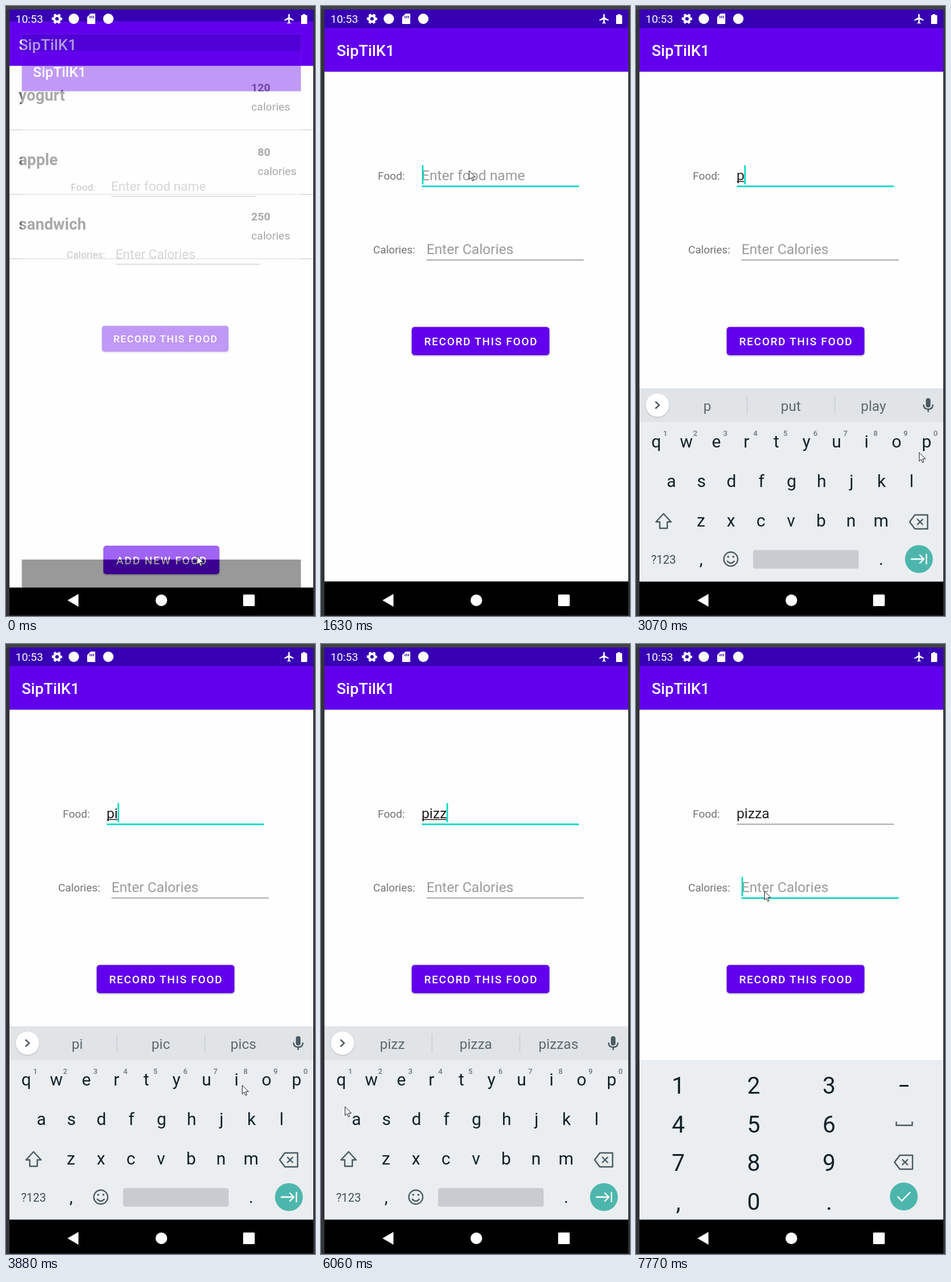
An HTML page that plays this animation: 533 px wide and 1050 px high, repeating every 8000 ms.

```html
<!DOCTYPE html>
<html lang="en">
<head>
<meta charset="utf-8">
<title>Food log</title>
<style>
  html, body { margin: 0; width: 100%; height: 100%; overflow: hidden; background: #333437; }
  svg { display: block; width: 100vw; height: 100vh; font-family: Roboto, sans-serif; }
  .title { font-weight: 500; font-size: 26.7px; fill: #fff; }
  .label { font-size: 18.7px; fill: #737373; }
  .field { font-size: 24.2px; }
  .hint { fill: #9b9b9b; }
  .button { font-weight: 500; font-size: 18.7px; letter-spacing: 1.67px; fill: #fff; }
  .raised { filter: drop-shadow(0 1.5px 1.5px #0006); }
  .food { font-weight: 700; font-size: 27.3px; fill: #737373; }
  .amount { font-size: 19.1px; fill: #737373; }
  .key { font-size: 29.5px; fill: #10212a; text-anchor: middle; }
  .digit { font-size: 40px; fill: #10212a; text-anchor: middle; }
  .small { font-size: 13px; font-weight: 500; fill: #6d777d; text-anchor: middle; }
  .word { font-size: 24px; fill: #5c686f; text-anchor: middle; }
  .line { fill: none; stroke: #4b5b63; stroke-width: 2.4; }
</style>
</head>
<body>
<svg viewBox="0 0 533 1050" preserveAspectRatio="none">
  <defs>
    <clipPath id="device"><rect x="6" y="6" width="524" height="1043"/></clipPath>
    <clipPath id="aboveNav"><rect x="6" y="600" width="524" height="390.5"/></clipPath>
    <g id="backspace" class="line">
      <path d="M-16 0L-7 -12H15V12H-7Z" stroke-linejoin="round"/>
      <path d="M-3 -5L7 5M7 -5L-3 5"/>
    </g>
  </defs>
  <rect width="533" height="6" fill="#414244"/>

  <g clip-path="url(#device)">
    <g id="listScreen">
      <rect x="6" y="6" width="524" height="1043" fill="#fefefe"/>
      <rect x="6" y="0" width="524" height="27" fill="#3700b3"/>
      <rect x="6" y="27" width="524" height="76" fill="#6200ee"/>
      <text class="title" x="22" y="76">SipTilK1</text>
      <g id="rows"></g>
      <rect class="raised" x="168" y="929" width="200" height="49" rx="5" fill="#6200ee"/>
      <text class="button" x="190" y="961" style="font-size:19.1px">ADD NEW FOOD</text>
      <rect x="6" y="1001" width="524" height="60"/>
    </g>

    <g id="formScreen">
      <rect x="6" y="6" width="524" height="1043" fill="#fefefe"/>
      <rect x="6" y="113" width="524" height="1.5" fill="#e2e2e2"/>
      <rect x="6" y="6" width="524" height="32.5" fill="#3700b3"/>
      <rect x="6" y="38" width="524" height="75" fill="#6200ee"/>
      <text class="title" x="27" y="86">SipTilK1</text>
      <text class="label" x="98" y="299">Food:</text>
      <text class="label" x="90" y="426">Calories:</text>
      <text class="field hint" id="foodHint" x="173.5" y="300">Enter food name</text>
      <text class="field" id="foodText" x="173.5" y="300" fill="#212121"></text>
      <rect id="composing" x="174" y="301.5" height="1.5" fill="#212121"/>
      <text class="field hint" x="182" y="427">Enter Calories</text>
      <rect id="foodLine" x="174" width="271"/>
      <rect id="caloriesLine" x="182" width="271"/>
      <rect id="caret" width="2.7" height="33" fill="#03dac5"/>
      <rect class="raised" x="156.5" y="552.5" width="237.5" height="48.5" rx="5" fill="#6200ee"/>
      <text class="button" x="178" y="584">RECORD THIS FOOD</text>
      <rect x="6" y="990.5" width="524" height="60"/>
    </g>

    <g clip-path="url(#aboveNav)">
      <g id="keyboard">
        <rect x="6" y="658" width="524" height="58" fill="#e0e4e7"/>
        <rect x="6" y="716" width="524" height="275" fill="#eaeef1"/>
        <rect id="pressed" width="52" height="67" rx="5" fill="#d3d8db"/>
        <circle cx="37" cy="687" r="20" fill="#fff" style="filter:drop-shadow(0 1px 1px #0003)"/>
        <path id="chevron" class="line" d="M3.5 -6L-3 0L3.5 6"/>
        <g id="tools">
          <g class="line">
            <circle cx="104.500" cy="685" r="6.800"/>
            <path d="M109.500 690L117.500 698" stroke-width="3.2"/>
            <path d="M186 697H174Q172 697 172 695V680Q172 678 174 678H190Q192 678 192 680V691ZM186 697V691H192M177 688Q182 694 187 688" stroke-width="2"/>
          </g>
          <path d="M176 681.500h3v3h-3zM185 681.500h3v3h-3z" fill="#4b5b63"/>
          <text x="258" y="693" text-anchor="middle" font-size="17.500" font-weight="900" fill="#4b5b63" letter-spacing="0.600">GIF</text>
          <rect x="325" y="677" width="22" height="22" fill="#5a686f"/>
          <path d="M382.500 672V703" stroke="#c5cbcf" stroke-width="1.300"/>
          <path d="M421 688h.01M430 688h.01M439 688h.01" stroke="#4b5b63" stroke-width="5.500" stroke-linecap="round"/>
        </g>
        <g id="suggestions">
          <path d="M191.500 672V703M343 672V703" stroke="#c5cbcf" stroke-width="1.300"/>
          <text class="word" x="123" y="697"></text>
          <text class="word" x="267" y="697"></text>
          <text class="word" x="409.500" y="697"></text>
        </g>
        <rect x="500" y="675" width="8" height="16" rx="4" fill="#4b5b63"/>
        <path class="line" d="M496 686Q496 694 504 694Q512 694 512 686M504 694V699"/>
        <g id="letters"></g>
        <path class="line" d="M47.500 874L60.500 888H54V899H41V888H34.500Z" stroke-linejoin="round"/>
        <use href="#backspace" x="488" y="888"/>
        <text x="47.500" y="960" text-anchor="middle" font-size="20" fill="#3f4f57">?123</text>
        <text class="key" x="112.500" y="962">,</text>
        <text class="key" x="423" y="962">.</text>
        <g class="line">
          <circle cx="163.500" cy="952" r="12"/>
          <path d="M157 955Q163.500 963 170 955"/>
        </g>
        <path d="M159 948h.01M168 948h.01" stroke="#4b5b63" stroke-width="3.600" stroke-linecap="round"/>
        <rect x="202" y="936.500" width="182" height="32" rx="4" fill="#c8ccd0"/>
        <circle cx="488" cy="952" r="24" fill="#4db6ac"/>
        <path class="line" style="stroke:#fff" d="M474 952H496M489 944.500L496.500 952L489 959.500M501 943V961"/>
      </g>
    </g>

    <g id="keypad">
      <rect x="6" y="716" width="524" height="274.500" fill="#eaeef1"/>
      <path d="M454.500 760.500H470" stroke="#10212a" stroke-width="3"/>
      <path class="line" d="M449 822V828.500H476.500V822"/>
      <use href="#backspace" x="462" y="892"/>
      <circle cx="462" cy="951" r="24" fill="#4db6ac"/>
      <path class="line" style="stroke:#fff" d="M451 951L458.500 958.500L473 943.500"/>
    </g>

    <g fill="#fff">
      <text x="16.500" y="29" font-size="19">10:53</text>
      <circle cx="88" cy="22" r="5" fill="none" stroke="#fff" stroke-width="4"/>
      <circle cx="88" cy="22" r="7.500" fill="none" stroke="#fff" stroke-width="3" stroke-dasharray="4.200 3.654" stroke-dashoffset="2.100"/>
      <circle cx="117" cy="22" r="9"/>
      <path d="M146 13H153Q154 13 154 14V30Q154 31 153 31H141Q140 31 140 30V19Z"/>
      <path d="M145 17V21M148 17V21M151 17V21" stroke="#3700b3" stroke-width="1.400"/>
      <circle cx="176.500" cy="22" r="9"/>
      <path transform="translate(478.500 12) scale(.84)" d="M21 16v-2l-8-5V3.500c0-.83-.67-1.500-1.500-1.500S10 2.670 10 3.500V9l-8 5v2l8-2.500V19l-2 1.500V22l3.500-1 3.500 1v-1.500L13 19v-5.500l8 2.500z"/>
      <path d="M512 14H516V15.500H518Q519.500 15.500 519.500 17V30Q519.500 31 518 31H510Q509 31 509 30V17Q509 15.500 510 15.500H512Z"/>
      <path d="M106 1023L125 1012V1034Z"/>
      <circle cx="268" cy="1023" r="10"/>
      <rect x="409" y="1013" width="20" height="20" rx="1.500"/>
    </g>
  </g>

  <path id="pointer" d="M.5 .5V15.500L4 12.300L6.300 18L8.600 17L6.300 11.500H11.300Z" fill="#fff" stroke="#222" stroke-width="1"/>
</svg>

<script>
const LOOP = 8000, FOOD_FOCUS = 1540, CALORIES_FOCUS = 7500, KEYPAD = 7770;
const $ = id => document.getElementById(id);

// Each track is a list of [time, ...values].
const pointerTrack = [
  [540, 329, 946], [810, 282, 250], [1000, 282, 250], [1270, 255, 283],
  [1720, 255, 283], [2260, 383, 747], [2600, 478, 790], [2800, 488, 768],
  [3100, 488, 768], [3600, 407, 759], [4100, 407, 759], [4600, 140, 915],
  [4780, 83, 912], [4880, 104, 891], [5800, 104, 891], [6060, 41, 796],
  [6500, 50, 815], [6870, 50, 815], [7050, 230, 414], [7150, 230, 414], [7320, 221, 425]
];
const openTrack = [[0, .918], [90, .9865], [180, .9967], [270, .999], [360, 1]];
const keyboardTrack = [[1680, 333], [1760, 190], [1850, 50], [1960, 0]];

const typed = [[0, ''], [2980, 'p'], [3880, 'pi'], [5150, 'piz'], [5700, 'pizz'], [6870, 'pizza']];
const suggested = [
  [0], [3070, 'p', 'put', 'play'], [3880, 'pi', 'pic', 'pics'], [5150, 'piz', 'pizza', 'pizzas'],
  [5700, 'pizz', 'pizza', 'pizzas'], [6870, 'pizza', 'pizzas', 'pizz']
];
const presses = [[2890, 'p'], [3790, 'i'], [5060, 'z'], [5610, 'z'], [6780, 'a']];

const current = (track, t) => track.findLast(step => step[0] <= t);

function tween(track, t) {
  const next = track.findIndex(step => step[0] > t);
  if (next === 0) return track[0].slice(1);
  if (next < 0) return track.at(-1).slice(1);
  const a = track[next - 1], b = track[next], k = (t - a[0]) / (b[0] - a[0]);
  return a.slice(1).map((v, i) => v + (b[i + 1] - v) * k);
}

const text = (cls, x, y, s) => `<text class="${cls}" x="${x}" y="${y}">${s}</text>`;
const show = (id, on) => $(id).setAttribute('visibility', on ? 'visible' : 'hidden');
const set = (id, attrs) => Object.entries(attrs).forEach(([k, v]) => $(id).setAttribute(k, v));
const zoom = s => `translate(268 527) scale(${s}) translate(-268 -527)`;

$('rows').innerHTML = [['yogurt', 120, 423], ['apple', 80, 434], ['sandwich', 250, 423]]
  .map(([name, amount, x], i) => {
    const y = 111 * i;
    return text('food', 22, 163 + y, name)
      + `<text class="amount" x="${x}" y="${147 + y}" font-weight="700">${amount}</text>`
      + text('amount', x, 180.5 + y, 'calories')
      + `<rect x="6" y="${212.5 + y}" width="524" height="1.4" fill="#d5d5d5"/>`;
  }).join('');

const keyCells = {};
[['qwertyuiop', 35, 760], ['asdfghjkl', 61, 828], ['zxcvbnm', 112, 895.5]].forEach(([row, x0, y], r) =>
  [...row].forEach((c, i) => {
    const x = x0 + 51.8 * i;
    keyCells[c] = { x: x - 26, y: 717.5 + 67.5 * r };
    $('letters').innerHTML += text('key', x, y, c)
      + (r ? '' : text('small', x + 15.5, 740, (i + 1) % 10));
  }));

[...'123456789,0.'].forEach((c, i) => {
  $('keypad').innerHTML += text('digit', 73 + 130 * (i % 3), 774 + 66.6 * Math.floor(i / 3), c);
});

function underline(id, y, focused) {
  set(id, focused ? { y: y - 1, height: 2.7, fill: '#03dac5' } : { y: y - .5, height: 1.4, fill: '#898989' });
}

function draw(t) {
  show('listScreen', t < 360);
  set('listScreen', { transform: zoom(1 + t / 360 * .025) });
  set('formScreen', { transform: zoom(tween(openTrack, t)[0]), opacity: Math.min(1, .38 + t / 83) });

  const onCalories = t >= CALORIES_FOCUS, onFood = t >= FOOD_FOCUS && !onCalories;
  const [typedAt, word] = current(typed, t);
  $('foodText').textContent = word;
  show('foodHint', !word);
  const width = word ? $('foodText').getComputedTextLength() : 0;
  set('composing', { width: t < KEYPAD ? width : 0 });
  underline('foodLine', 310, onFood);
  underline('caloriesLine', 437, onCalories);

  const blinkStart = onCalories ? CALORIES_FOCUS : Math.max(FOOD_FOCUS, typedAt);
  show('caret', (onFood || onCalories) && (t - blinkStart) % 1000 < 500);
  set('caret', onCalories ? { x: 182, y: 401 } : { x: 174 + Math.max(0, width - 1), y: 274 });

  const [, ...words] = current(suggested, t);
  show('keyboard', t >= 1680 && t < KEYPAD);
  set('keyboard', { transform: `translate(0 ${tween(keyboardTrack, t)[0]})` });
  $('tools').style.display = words.length ? 'none' : '';
  $('suggestions').style.display = words.length ? '' : 'none';
  $('suggestions').querySelectorAll('text').forEach((el, i) => el.textContent = words[i] || '');
  set('chevron', { transform: `translate(37 687) scale(${words.length ? -1 : 1} 1)` });
  show('keypad', t >= KEYPAD);

  const press = presses.find(([at]) => t >= at && t < at + 90);
  $('pressed').style.display = press ? '' : 'none';
  if (press) set('pressed', keyCells[press[1]]);

  set('pointer', { transform: `translate(${tween(pointerTrack, t).map(Math.round)})` });
}

const start = performance.now();
function frame() {
  draw((performance.now() - start) % LOOP);
  requestAnimationFrame(frame);
}
frame();
</script>
</body>
</html>
```
